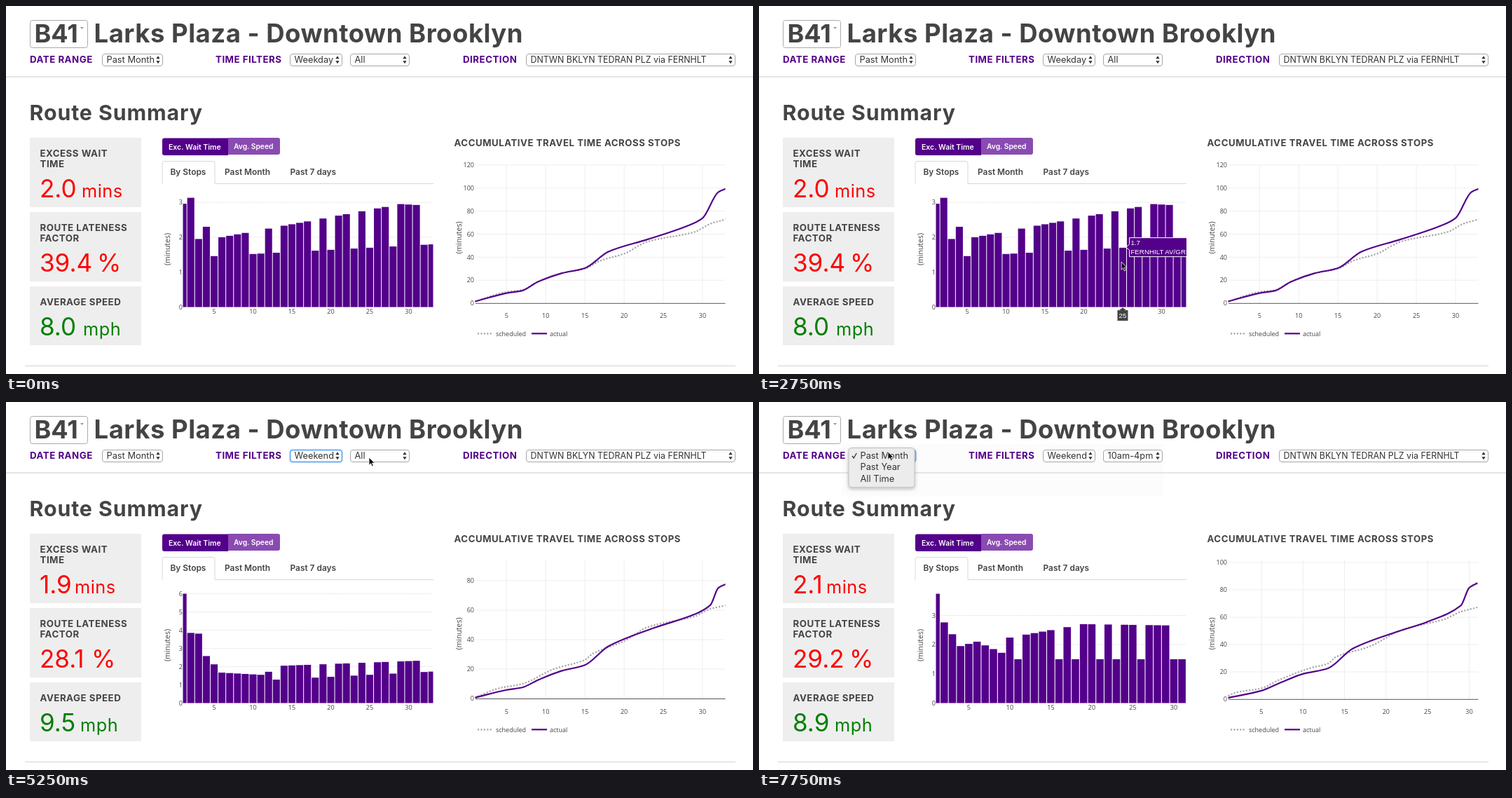
An HTML page for the animation above (8000 ms loop, 1066x525 px).

```html
<!DOCTYPE html>
<html lang="en">
<head>
<meta charset="utf-8">
<title>Route dashboard</title>
<style>
html, body { margin: 0; width: 100%; height: 100%; overflow: hidden; background: #fff; }
svg { display: block; width: 100%; height: 100%; }
text { white-space: pre; }
.ui { font-family: Inter, sans-serif; fill: #333; font-size: 12.8px; }
.b { font-family: Inter, sans-serif; fill: #444; font-weight: 700; }
.label { font-size: 13.3px; letter-spacing: .5px; }
.chart { font-family: "Open Sans", sans-serif; fill: #444; font-size: 9px; }
.tip { font-family: "Liberation Sans", Arial, sans-serif; fill: #fff; font-size: 9.75px; }
</style>
</head>
<body>
<svg id="stage" viewBox="0 0 1066 525" xmlns="http://www.w3.org/2000/svg"></svg>
<script>
const LOOP = 8000, TICK = 250;
const PURPLE = '#53008a', RING = '#6cb0f5';
const stage = document.getElementById('stage');
const meter = document.createElement('canvas').getContext('2d');

const text = (x, y, s, cls, style = '') =>
  `<text x="${x}" y="${y}" class="${cls}" style="${style}">${s}</text>`;
const rect = (x, y, w, h, fill, more = '') =>
  `<rect x="${x}" y="${y}" width="${w}" height="${h}" fill="${fill}" ${more}/>`;
const path = (d, more) => `<path d="${d}" ${more}/>`;
const line = (x1, y1, x2, y2, color, more = '') =>
  path(`M${x1} ${y1}L${x2} ${y2}`, `stroke="${color}" fill="none" ${more}`);
const range = (from, to, by = 1) => {
  const out = [];
  for (let v = from; v <= to; v += by) out.push(v);
  return out;
};

// Linear interpolation between keys [at, ...values]
function between(keys, at) {
  const i = keys.findIndex(k => k[0] >= at);
  if (i < 1) return keys.at(i).slice(1);
  const [a, b] = [keys[i - 1], keys[i]];
  const f = (at - a[0]) / (b[0] - a[0]);
  return a.slice(1).map((v, k) => v + (b[k + 1] - v) * f);
}

// Wait times follow a busy level, except at quiet stops, counted from the end of the route.
const QUIET = [0, 1, 5, 8, 10, 13, 15, 20];
const views = {
  weekday: {
    stops: 33, stats: [['2.0', 108], ['39.4', 130], ['8.0', 110]],
    barDx: 11.1, barScale: 49.8, barMax: 3,
    lineDx: 11.19, lineScale: 1.6417, lineMax: 120, lineBase: 424,
    quietStops: [...QUIET, 22, 23, 28], quiet: i => 1.4 + .012 * i,
    busy: [[1, 2.96], [2, 3.13], [3, 1.95], [4, 2.3], [6, 2], [29, 2.95], [33, 2.9]],
    scheduled: [[1, 1.5], [5, 9.8], [7, 11.5], [9, 18.8], [12, 26], [15, 30], [17, 37], [20, 43], [23, 53.5], [29, 62], [31, 69], [33, 73]],
    actual: [[1, 1.5], [5, 8.8], [7, 10.9], [9, 18.6], [12, 26], [15, 30.5], [18, 44.8], [23, 55.5], [28, 67], [30, 74], [32, 96.5], [33, 99.5]]
  },
  weekend: {
    stops: 33, stats: [['1.9', 98], ['28.1', 122], ['9.5', 106]],
    barDx: 11.1, barScale: 26, barMax: 6,
    lineDx: 11.19, lineScale: 2.104, lineMax: 80, lineBase: 423.2,
    quietStops: QUIET, quiet: i => 1 + .022 * i,
    busy: [[1, 6], [2, 3.85], [3, 3.81], [4, 2.58], [6, 1.67], [11, 1.55], [14, 2.05], [33, 2.35]],
    scheduled: [[1, .7], [4, 7], [7, 10], [11, 20], [15, 26.3], [16, 30.5], [20, 39], [23, 48.5], [29, 55.8], [31, 60.9], [33, 63.2]],
    actual: [[1, .7], [5, 5.9], [7, 7.6], [9, 12.6], [12, 18.8], [15, 22.8], [18, 35.5], [24, 48.3], [29, 57.2], [31, 63.5], [32, 75], [33, 77.7]]
  },
  midday: {
    stops: 31, stats: [['2.1', 96], ['29.2', 129], ['8.9', 108]],
    barDx: 11.7, barScale: 41.7, barMax: 3,
    lineDx: 11.86, lineScale: 1.95, lineMax: 100, lineBase: 424,
    quietStops: QUIET, quiet: () => 1.5,
    busy: [[1, 3.74], [2, 2.76], [4, 1.95], [6, 2.1], [9, 1.72], [10, 2.24], [19, 2.7], [31, 2.65]],
    scheduled: [[1, 2.5], [2, 5], [5, 8], [7, 13.8], [11, 23], [13, 26], [14, 31], [18, 38.5], [22, 51], [27, 58.5], [29, 64], [31, 67.2]],
    actual: [[1, 1], [5, 6.2], [7, 11.3], [10, 18.5], [13, 22.6], [16, 37], [21, 48.7], [25, 56.7], [29, 68.5], [30, 81.5], [31, 85]]
  }
};

const waitAt = (view, stop) => view.quietStops.includes(view.stops - stop)
  ? view.quiet(stop) : between(view.busy, stop)[0];

// Pointer path: tick, x, y
const track = [
  [2, 562, 121], [6, 487, 218], [7, 273, 345], [8, 312, 364], [11, 517, 365], [15, 441, 76],
  [16, 449, 83], [17, 446, 92], [18, 446, 92], [21, 518, 79], [22, 519, 80], [25, 524, 113],
  [26, 523, 107], [29, 523, 107], [30, 205, 77], [31, 184, 71]
];

const streets = ['FERNLANDS AV', 'OSMER ST', 'TILDRUM AV', 'GRELLEN AV'];

// Monotone cubic through the points
function smooth(pts) {
  const slope = i => (pts[i + 1][1] - pts[i][1]) / (pts[i + 1][0] - pts[i][0]);
  const last = pts.length - 1;
  const tangent = i => {
    const a = slope(Math.max(0, i - 1)), b = slope(Math.min(last - 1, i));
    return a * b > 0 ? 2 * a * b / (a + b) : 0;
  };
  let d = `M${pts[0]}`;
  for (let i = 0; i < last; i++) {
    const [x0, y0] = pts[i], [x1, y1] = pts[i + 1], h = (x1 - x0) / 3;
    d += `C${x0 + h} ${y0 + h * tangent(i)} ${x1 - h} ${y1 - h * tangent(i + 1)} ${x1} ${y1}`;
  }
  return d;
}

function select(x, w, value, focus) {
  const r = x + w - 7;
  return rect(x + .5, 68.5, w - 1, 17, '#fff', `rx="3.5" stroke="${focus ? RING : '#a6a6a6'}" stroke-width="${focus ? 2 : 1}"`) +
    text(x + 6.5, 80.7, value, 'ui', w > 200 ? 'font-size:12.4px' : '') +
    path(`M${r - 2.7} 75.3h5.4l-2.7 -4zM${r - 2.7} 78.2h5.4l-2.7 4z`, 'fill="#333"');
}

function menu(x, w, top, items, checked, lit) {
  const row = 16.4;
  let s = rect(x, top - 3, w, items.length * row + 7, '#ececec', 'rx="4" stroke="#b4b4b4" stroke-width=".8" filter="url(#shade)"');
  items.forEach((item, i) => {
    const y = top + i * row, on = i === lit;
    if (on) s += rect(x, y, w, row, '#3f97fb');
    if (i === checked) s += path(`M${x + 5} ${y + 8.5}l2.2 3 4 -7`, `fill="none" stroke="${on ? '#fff' : '#333'}" stroke-width="1.3"`);
    s += text(x + 16.5, y + 12.4, item, 'ui', on ? 'fill:#fff' : '');
  });
  return s;
}

function header(tick) {
  const day = tick < 18 ? 'Weekday' : 'Weekend';
  const hours = tick < 27 ? 'All' : '10am-4pm';
  return rect(34.5, 20.5, 82, 39, '#fff', 'rx="3" stroke="#aaa"') +
    text(40.5, 52, 'B41', 'b', 'font-size:36px') +
    path('M106 30h5l-2.5 3z', 'fill="#999"') +
    text(125.5, 52, 'Larks Plaza - Downtown Brooklyn', 'b', 'font-size:36.5px;letter-spacing:.5px') +
    [[34, 'DATE RANGE'], [299, 'TIME FILTERS'], [652, 'DIRECTION']]
      .map(([x, s]) => text(x, 80.7, s, 'b label', `fill:${PURPLE}`)).join('') +
    select(137, 87, 'Past Month', tick > 29) +
    select(405, 75, day, tick > 14 && tick < 22) +
    select(491, 85, hours, tick > 21 && tick < 30) +
    select(742, 299, 'DNTWN BKLYN TEDRAN PLZ via FERNHLT') +
    line(0, 101, 1066, 101, '#ccc') +
    line(27, 513.5, 1041, 513.5, '#d4d4d4') +
    text(33.5, 162.5, 'Route Summary', 'b', 'font-size:30.3px;letter-spacing:.9px');
}

function cards(view) {
  const rows = [
    [188, 99, ['EXCESS WAIT', 'TIME'], 'mins', 'red'],
    [294, 99, ['ROUTE LATENESS', 'FACTOR'], '%', 'red'],
    [400, 84, ['AVERAGE SPEED'], 'mph', 'green']
  ];
  return rows.map(([y, h, title, unit, color], i) => {
    const [value, unitX] = view.stats[i], base = y + h - 14;
    const big = `font-size:35px;fill:${color}`;
    return rect(34, y, 159, h, '#eee') +
      title.map((s, k) => text(48.5, y + 27 + k * 14.5, s, 'b label')).join('') +
      text(48, base, value, 'ui', big) +
      text(unitX, base, unit, 'ui', unit === '%' ? big : `font-size:25.3px;letter-spacing:.5px;fill:${color}`);
  }).join('');
}

function tabs() {
  return path('M317 188.5h-91q-3 0 -3 3v18.5q0 3 3 3h91z', `fill="${PURPLE}"`) +
    path('M317 188h71q3 0 3 3v18q0 3 -3 3h-71z', 'fill="#894bb1"') +
    text(232, 204.6, 'Exc. Wait Time', 'b', 'font-size:10.5px;fill:#fff;font-weight:600') +
    text(325, 204.2, 'Avg. Speed', 'b', 'font-size:10.3px;fill:#fff;font-weight:600') +
    path('M223 253.5V224.5q0 -3 3 -3h69q3 0 3 3V253.5H610', 'fill="none" stroke="#d8d8d8"') +
    [[234.5, 'By Stops'], [312, 'Past Month'], [405.5, 'Past 7 days']]
      .map(([x, s]) => text(x, 241.3, s, 'b', 'font-size:11.9px;font-weight:600')).join('');
}

const axisTitle = (x, y) =>
  `<text class="chart" transform="translate(${x} ${y}) rotate(-90)" text-anchor="middle" style="font-size:10.5px">(minutes)</text>`;
const barX = (view, stop) => 252.6 + view.barDx * (stop - 1);

function barChart(view) {
  const base = 429.5, w = view.barDx * .91;
  let s = axisTitle(234, 347);
  for (const v of range(0, view.barMax)) {
    const y = base - v * view.barScale;
    if (v) s += line(252.5, y, 609.5, y, '#e6e6e6', 'stroke-dasharray="2 1"');
    s += text(252, y + 3.2, v, 'chart', 'text-anchor:end');
  }
  s += '<g clip-path="url(#barArea)">';
  for (const stop of range(1, view.stops)) {
    const h = waitAt(view, stop) * view.barScale;
    s += rect(barX(view, stop) - w / 2, base - h, w, h, PURPLE);
  }
  s += '</g>';
  for (const stop of range(5, view.stops, 5))
    s += text(barX(view, stop), 439.3, stop, 'chart', 'text-anchor:middle');
  return s;
}

function lineChart(view) {
  const base = view.lineBase;
  const x = stop => 669.5 + view.lineDx * (stop - 1);
  const y = v => base - v * view.lineScale;
  const curve = keys => smooth(keys.map(([stop, v]) => [x(stop), y(v)]));
  let s = text(639.5, 200, 'ACCUMULATIVE TRAVEL TIME ACROSS STOPS', 'b', 'font-size:13.2px;letter-spacing:.55px') +
    axisTitle(650, 330.5);
  for (const stop of range(5, view.stops, 5))
    s += line(x(stop), 226, x(stop), base, '#eee') +
      text(x(stop), 445, stop, 'chart', 'text-anchor:middle');
  for (const v of range(0, view.lineMax, 20))
    s += (v ? line(670, y(v), 1026.5, y(v), '#eee') : '') +
      text(668, y(v) + 3.2, v, 'chart', 'text-anchor:end');
  const dots = 'stroke-width="2.2" stroke-dasharray="2.2 2.2"';
  return s + line(670, base + .3, 1026.5, base + .3, '#555') +
    '<g clip-path="url(#lineArea)">' +
    path(curve(view.scheduled), `fill="none" stroke="#a5a5a5" ${dots}`) +
    path(curve(view.actual), `fill="none" stroke="${PURPLE}" stroke-width="2.2"`) + '</g>' +
    line(673, 467.3, 694, 467.3, '#a5a5a5', dots) + text(699, 470.6, 'scheduled', 'chart') +
    line(750, 467.3, 772, 467.3, PURPLE, 'stroke-width="2.2"') + text(776, 470.6, 'actual', 'chart');
}

// The hover label sweeps over the bars while the pointer crosses them.
function hover(view, tick) {
  const step = tick - 8;
  if (step < 0 || step > 3) return '';
  const stop = 4 + 7 * step, name = 'FERNHILT AV/' + streets[step];
  const cx = barX(view, stop), value = waitAt(view, stop);
  const x = cx + 5.1, y = 428.8 - value * view.barScale, half = stop > 9 ? 7.5 : 4.6;
  meter.font = '9.75px "Liberation Sans", Arial, sans-serif';
  const w = meter.measureText(name).width + 4;
  return '<g clip-path="url(#tipArea)">' +
    path(`M${x} ${y}l4.5 -4.5v-9h${w}v27h${-w}v-9z`, `fill="${PURPLE}" stroke="#fff"`) +
    text(x + 6.3, y - 3.2, value.toFixed(1), 'tip') + text(x + 6.3, y + 9.9, name, 'tip') + '</g>' +
    path(`M${cx} 430l4 4h${half - 4}v15h${-2 * half}v-15h${half - 4}z`, 'fill="#444"') +
    text(cx, 445, stop, 'tip', 'text-anchor:middle');
}

function pointer(tick) {
  if (tick < track[0][0]) return '';
  return path('M0 0V11.2L2.6 8.8L4.3 12.8L6.3 12L4.6 8.1H8.2Z',
    `transform="translate(${between(track, tick)})" fill="#111" stroke="#fff" stroke-width=".8"`);
}

function popup(tick) {
  if (tick > 14 && tick < 18)
    return [rect(386, 51, 104, 67, '#f6f6f6'),
      menu(396, 83, 52.2, ['All', 'Weekday', 'Weekend'], 1, tick === 17 ? 2 : 1)];
  if (tick > 21 && tick < 27)
    return [rect(403, 60, 184, 108, '#f7f7f7'),
      menu(482.3, 94.5, 68.5, ['All', '7am-10am', '10am-4pm', '4pm-7pm', '7pm-10pm'], 0, tick === 26 ? 2 : -1)];
  if (tick === 31)
    return [rect(118, 60, 459, 75, '#fcfcfc'),
      menu(128, 94, 68.5, ['Past Month', 'Past Year', 'All Time'], 0, -1)];
  return ['', ''];
}

const clip = (id, x, w) => `<clipPath id="${id}">${rect(x, 200, w, 260, '#000')}</clipPath>`;
const defs = '<defs>' + clip('barArea', 252.5, 357) + clip('tipArea', 252.5, 357.5) + clip('lineArea', 669, 357.5) +
  '<filter id="shade" x="-20%" y="-20%" width="140%" height="150%"><feDropShadow dx="0" dy="2" stdDeviation="2.5" flood-opacity=".28"/></filter></defs>';

function render(tick) {
  const view = views[tick < 19 ? 'weekday' : tick < 28 ? 'weekend' : 'midday'];
  const [halo, list] = popup(tick);
  stage.innerHTML = defs + halo + header(tick) + cards(view) + tabs() + barChart(view) + lineChart(view) +
    hover(view, tick) + list + pointer(tick);
}

let shown = -1;
const start = performance.now();
function loop() {
  const tick = Math.floor((performance.now() - start) % LOOP / TICK);
  if (tick !== shown) render(shown = tick);
  requestAnimationFrame(loop);
}
loop();
</script>
</body>
</html>
```
